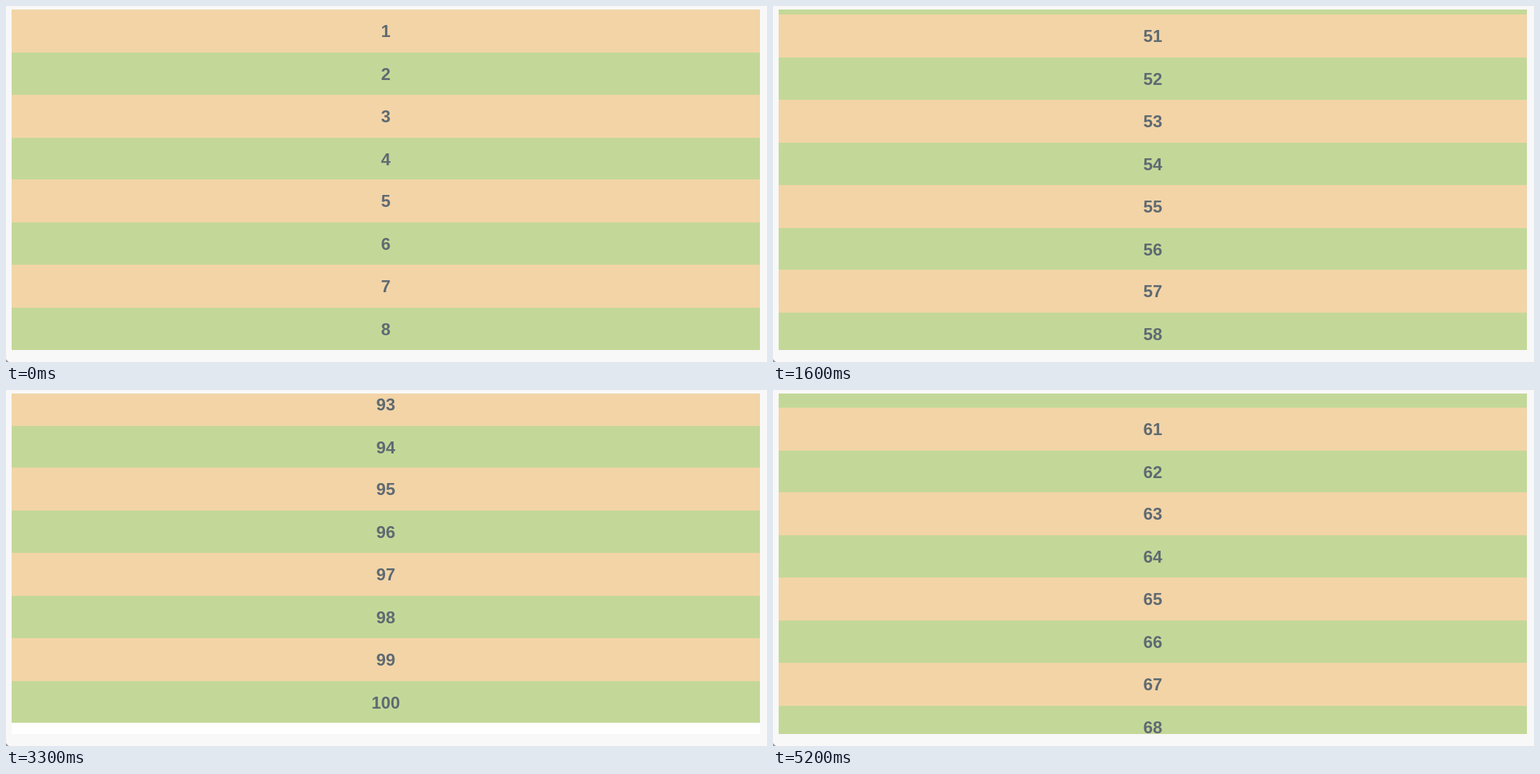
Write an HTML page that moves like this. It is 1080 px wide and 505 px high and loops after 5.3 s.

```html
<!DOCTYPE html>
<html lang="en">
<head>
<meta charset="utf-8">
<title>Scrolling list</title>
<style>
  html, body { margin: 0; width: 100%; height: 100%; overflow: hidden; background: #f8f8f8; }
  #view { position: absolute; left: 8px; top: 5px; width: 1062px; height: 483px; overflow: hidden; background: #fff; }
  #list div {
    height: 61px;
    background: #f2d4a7;
    color: #5f6a72;
    font: bold 24.2px/61.6px "Liberation Sans", Arial, sans-serif;
    text-align: center;
  }
  #list div:nth-child(even) { height: 59.7px; background: #c3d898; }
  #corner {
    position: absolute; left: 0; bottom: 0; width: 9px; height: 9px;
    background: radial-gradient(circle at 9px 0, #f8f8f8 9.7px, #999 10.4px);
  }
</style>
</head>
<body>
<div id="view"><div id="list"></div></div>
<div id="corner"></div>
<script>
const LOOP = 5300, STEP = 100, DECAY = 325, END = 5567;
const list = document.getElementById('list');
for (let i = 1; i <= 100; i++) {
  const row = document.createElement('div');
  row.textContent = i;
  list.append(row);
}

// Each flick drags the list to a point, then lets it glide to rest
const flicks = [
  { start: 450, release: 900, from: 592, rest: 3327 },
  { start: 2250, release: 2450, from: 3592, rest: 5723 },
  { start: 3380, release: 3650, from: 5431, rest: 3585 }
];

function offset(t, i = flicks.length - 1) {
  if (i < 0) return 0;
  const { start, release, from, rest } = flicks[i];
  if (t < start) return offset(t, i - 1);
  if (t < release) {
    const y = offset(start, i - 1);
    return y + (from - y) * ((t - start) / (release - start)) ** 3;
  }
  return Math.min(END, rest + (from - rest) * Math.exp((release - t) / DECAY));
}

function draw(now) {
  const t = Math.floor(now % LOOP / STEP) * STEP;
  list.style.transform = `translateY(${-Math.round(offset(t))}px)`;
  requestAnimationFrame(draw);
}
requestAnimationFrame(draw);
</script>
</body>
</html>
```
